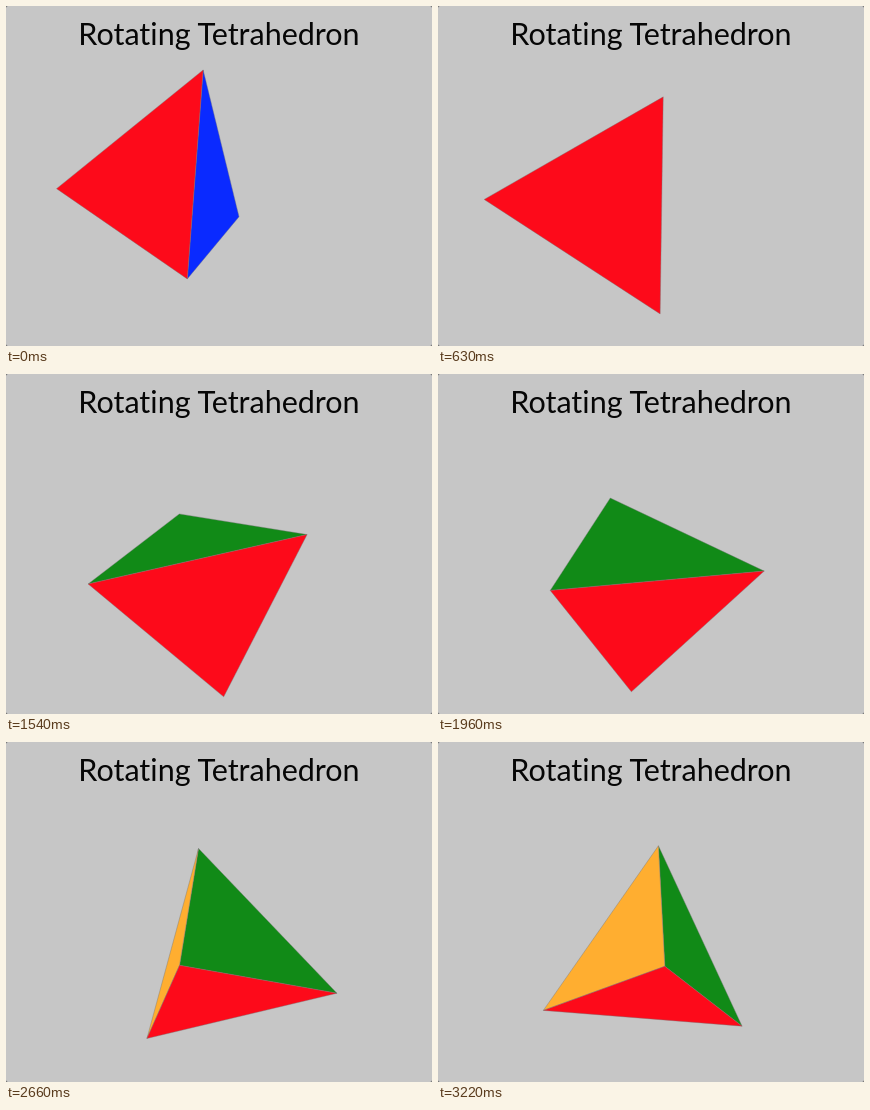
Write an HTML page that moves like this. It is 426 by 340 pixels and loops after 3.29 s.

```html
<!DOCTYPE html>
<html lang="en">
<head>
<meta charset="utf-8">
<title>Rotating Tetrahedron</title>
<style>
  html, body { margin: 0; width: 100%; height: 100%; overflow: hidden; background: #555; }
  svg { display: block; width: 426px; height: 340px; background: #c6c6c6; border-radius: 2px; }
  text {
    font: 30.5px Lato, sans-serif;
    font-variant-ligatures: none;
    text-anchor: middle;
    fill: #060606;
  }
  polygon { stroke: #777; stroke-opacity: .5; stroke-width: .8; stroke-linejoin: round; }
</style>
</head>
<body>
<svg viewBox="0 0 426 340">
  <text x="213" y="39">Rotating Tetrahedron</text>
  <g id="solid"></g>
</svg>
<script>
const STEP = 70, STEPS = 47;            // ms per step, steps per loop
const START = 15, TURN = -2.39;         // degrees, degrees per step
const CENTER = { x: 213, y: 190 };
const CAMERA = 1000;                    // distance from the pivot
const EDGE = 200;

// Regular tetrahedron: the pivot halves the base triangle's altitude.
const altitude = EDGE * Math.sqrt(3) / 2;
const height = EDGE * Math.sqrt(2 / 3);
const corners = {
  a: [-altitude / 6, 0, height],
  b: [-altitude / 2, -EDGE / 2, 0],
  c: [-altitude / 2, EDGE / 2, 0],
  d: [altitude / 2, 0, 0]
};

// Corners run clockwise on screen when a face looks at the viewer.
const faces = [
  { ring: 'bdc', color: '#0a2aff' },
  { ring: 'adb', color: '#118a17' },
  { ring: 'acd', color: '#ffae30' },
  { ring: 'abc', color: '#fd0a1a' }
];

const solid = document.getElementById('solid');
for (const face of faces) {
  face.node = document.createElementNS('http://www.w3.org/2000/svg', 'polygon');
  face.node.setAttribute('fill', face.color);
  solid.append(face.node);
}

// Spin about the apex axis, swing about the vertical by the same angle, project.
function project([p, q, r], angle) {
  const cos = Math.cos(angle), sin = Math.sin(angle);
  const side = p * cos - q * sin;
  const x = side * sin - r * cos;
  const y = p * sin + q * cos;
  const z = -side * cos - r * sin;
  const scale = CAMERA / (CAMERA - z);
  return [CENTER.x + x * scale, CENTER.y + y * scale];
}

function facesViewer([p, q, r]) {
  return (q[0] - p[0]) * (r[1] - p[1]) - (q[1] - p[1]) * (r[0] - p[0]) > 0;
}

function draw(step) {
  const angle = (START + TURN * step) * Math.PI / 180;
  for (const { ring, node } of faces) {
    const points = [...ring].map(name => project(corners[name], angle));
    node.setAttribute('points', points.join(' '));
    node.style.display = facesViewer(points) ? '' : 'none';
  }
}

const start = performance.now();
function tick() {
  draw(Math.floor((performance.now() - start) / STEP) % STEPS);
  requestAnimationFrame(tick);
}
tick();
</script>
</body>
</html>
```
